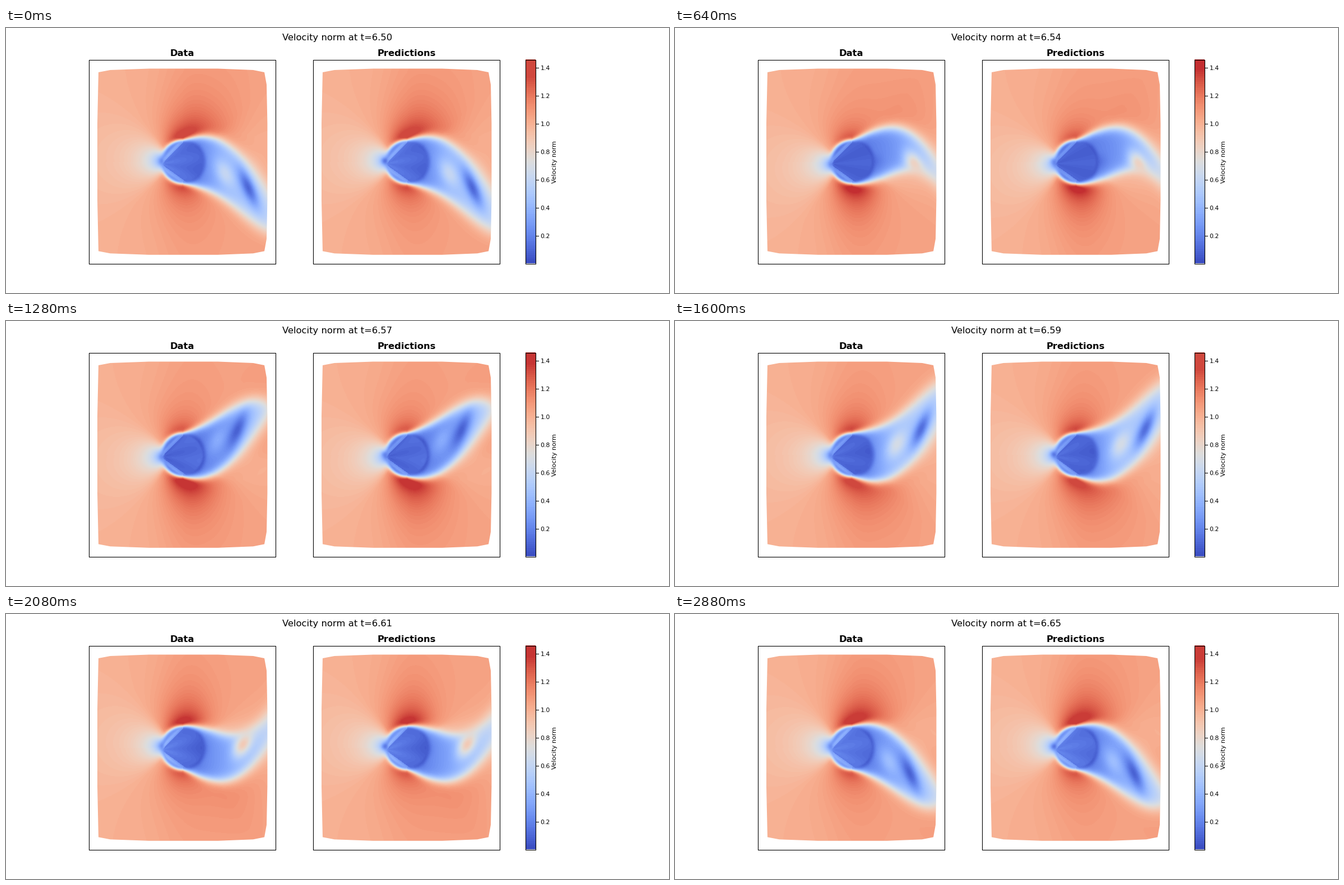
A matplotlib script for the animation above (3040 ms loop, 1183x473 px).

```python
import numpy as np
import matplotlib.pyplot as plt
from matplotlib.animation import FuncAnimation
from matplotlib.patches import Polygon, Rectangle

W, H, DPI = 1183, 473, 128
PX = 72 / DPI                      # one pixel in points
FRAMES, STEP = 19, 160
PERIOD = 19                        # one full shedding cycle, in frames
HALF = PERIOD / 2
VMAX = 1.458
CX, CY, R = 316, 239, 36           # cylinder in the left panel
RIM = 39.5                         # cylinder plus boundary layer
X0, X1, Y0, Y1 = 160, 470, 70, 410
SHIFT = 400                        # distance between the panels

xs = np.arange(X0, X1) + 0.5
x, y = np.meshgrid(xs, np.arange(Y0, Y1) + 0.5)
X, Y = x - CX, CY - y
r = np.hypot(X, Y)
z = np.where(r < 20, 20, X + 1j * Y)
soft = np.interp(xs, [316, 360, 466], [2, 4.5, 8])


def sigmoid(a):
    return 1 / (1 + np.exp(-np.clip(a, -40, 40)))


def wave(p, peak, period=PERIOD):
    return np.cos(2 * np.pi * (p - peak) / period)


def pulse(q, peak, width, power=2):
    return np.exp(-np.abs((q - peak) / width) ** power)


def gauss(h, cx, ch, sx, sy, tilt=0.0):
    a, b = x - cx, h - ch
    c, s = np.cos(tilt), np.sin(tilt)
    return np.exp(-0.5 * (((a * c + b * s) / sx) ** 2 + ((b * c - a * s) / sy) ** 2))


def sides(p):
    """Upper and lower half: same motion, mirrored, half a cycle apart."""
    return (p, Y), ((p + HALF) % PERIOD, -Y)


def outside(q, h):
    """Distance beyond the wake edge, which flaps as a growing travelling wave."""
    s = np.clip((xs - CX) / 150, 0, None)
    edge = RIM + 38 * s - 54 * s ** 2
    edge += 86 * s ** 1.5 * wave(q, 3.7 + 5.5 * s)
    edge += 24 * s ** 2 * wave(q, 2.5 * s - 1, HALF)
    slope = np.hypot(1, np.gradient(edge))
    return np.where(X < 0, np.sign(h) * r - RIM, (h - edge) / slope)


def jet(q, h, gap):
    """Fast layer hugging the edge: a pulsing shoulder and a drifting crest."""
    speed = (0.1 + 0.09 * wave(q, 15)) * pulse(x, 328, 42)
    for life in (q, q + PERIOD):
        speed = speed + 0.19 * pulse(life, 20, 7) * pulse(x, 345 + 13 * (life - 17), 64)
    return speed * np.exp(-np.maximum(gap, 0) / 48) * sigmoid(h / 8)


def outer_flow(p):
    """Potential flow round a cylinder, its nose point rocking up and down."""
    turn = 0.28 * wave(p, 5.65)
    v = np.abs(1 - R ** 2 * np.exp(1j * turn) / z ** 2)
    v = np.where(X > 0, np.maximum(v, 0.95), v)
    v = np.where(v > 1, 1 + 0.4 * (v - 1), v)
    return v + 0.05 * sigmoid((x - 285) / 18)


def add_eddy(v, q, h, mask):
    """Pale eddy centre and the dark crescent that runs ahead of it."""
    pale = 1.05 * sigmoid((q - 8.8) / 1.6)
    k = 0.9 * pulse(q, 11, 4.5, 4)
    v = v + (pale - v) * k * mask * gauss(h, 305 + 9.1 * q, 55 - 3.6 * q, 18, 10, 1.1)
    rise = sigmoid((q - 6.3) / 0.6)
    k = 0.95 * pulse(q, 8, 4, 4)
    dark = gauss(h, 305 + 13.4 * q, 46 * rise, 9 + 16 * rise, 8, 1.16)
    return v + (0.06 - v) * k * mask * dark


def cylinder(p):
    """Flat facets fanning out from the nose, paler beyond two chords."""
    fan = np.arctan2(Y + 3, X + 36)
    v = 0.14 + 0.015 * np.sin(9 * fan + 2 * np.pi * p / PERIOD)
    v += 0.08 * wave(p, 15.5) * (0.5 - X / 72)
    v -= 0.05 * (1 + wave(p, 2, HALF)) * (0.5 + X / 72)
    for cut in (Y - 1 - 1.03 * (X + 33), -Y - 8 - 0.72 * (X + 33)):
        v += np.where(cut > 0, 0.07 + 0.12 * pulse(cut, 5, 5), 0)
    return v


def field(p):
    inner = np.interp(x, [281, 345, 400, 466], [.25, .18, .32, .52])
    inner += 0.15 * pulse(x, 395, 45) * wave(p, 1.3, HALF)
    inner -= np.where(X > 0, 0.13 * pulse(r, R, 6), 0)
    flow, mask = outer_flow(p), 1
    for q, h in sides(p):
        gap = outside(q, h)
        flow += jet(q, h, gap)
        mask = mask * sigmoid(-gap / soft)
    v = flow * (1 - mask) + inner * mask
    for q, h in sides(p):
        v = add_eddy(v, q, h, mask)
    body = sigmoid(R - 1 - r)
    return np.maximum(v * (1 - body) + cylinder(p) * body, 0.02)


fig = plt.figure(figsize=(W / DPI, H / DPI), dpi=DPI, facecolor="white")
ax = fig.add_axes([0, 0, 1, 1])
ax.axis("off")
cmap = plt.get_cmap("coolwarm", 100)


def picture(data, extent):
    return ax.imshow(data, extent=extent, cmap=cmap, vmin=0, vmax=VMAX,
                     aspect="auto", interpolation="nearest")


def box(left, width):
    ax.add_patch(Rectangle((left, 56.5), width, 364, fill=False,
                           ec="black", lw=1.1 * PX, zorder=3))


def label(tx, ty, s, px, **kw):
    return ax.text(tx, ty, s, fontsize=px * PX, family="DejaVu Sans", **kw)


rim = np.array([(163, 170), (165, 79), (186, 75), (255, 72.5), (378, 72.5),
                (441, 75), (461, 79), (465, 101), (466.4, 170)])
outline = np.vstack([rim, (rim * (1, -1) + (0, 477.3))[::-1]])

panels = []
for dx, name in ((0, "Data"), (SHIFT, "Predictions")):
    im = picture(np.zeros_like(x), (X0 + dx, X1 + dx, Y1, Y0))
    im.set_clip_path(Polygon(outline + (dx, 0), transform=ax.transData))
    panels.append(im)
    box(148.5 + dx, 333)
    label(314.7 + dx, 50.5, name, 16.43, weight="bold", ha="center")

ramp = np.linspace(VMAX, 0, 364)[:, None]
bar = picture(ramp, (927.5, 945.5, 420.5, 56.5))
box(927.5, 18)
for i in range(1, 8):
    ty = 421 - 249.7 * 0.2 * i
    ax.plot([946, 950.5], [ty, ty], color="black", lw=1.1 * PX)
    label(953.3, ty + 4, f"{0.2 * i:.1f}", 10.95)
label(979.5, 239.5, "Velocity norm", 10.95, rotation=90, ha="center", va="center")
title = label(591.3, 22, "", 16.43, ha="center")

ax.set_xlim(0, W)
ax.set_ylim(H, 0)


def draw(i):
    peak = VMAX * (0.942 + 0.033 * wave(i, 5.7, HALF))
    v = np.minimum(field(i), peak)
    panels[0].set_data(v)
    panels[1].set_data(np.maximum(v - 0.12 * gauss(Y, 274, 2, 4, 4), 0.02))
    bar.set_data(np.minimum(ramp, peak))
    title.set_text(f"Velocity norm at t={6.5015 + 0.0084 * i:.2f}")
    return [*panels, bar, title]


anim = FuncAnimation(fig, draw, frames=FRAMES, interval=STEP, repeat=True)
plt.show()
```
